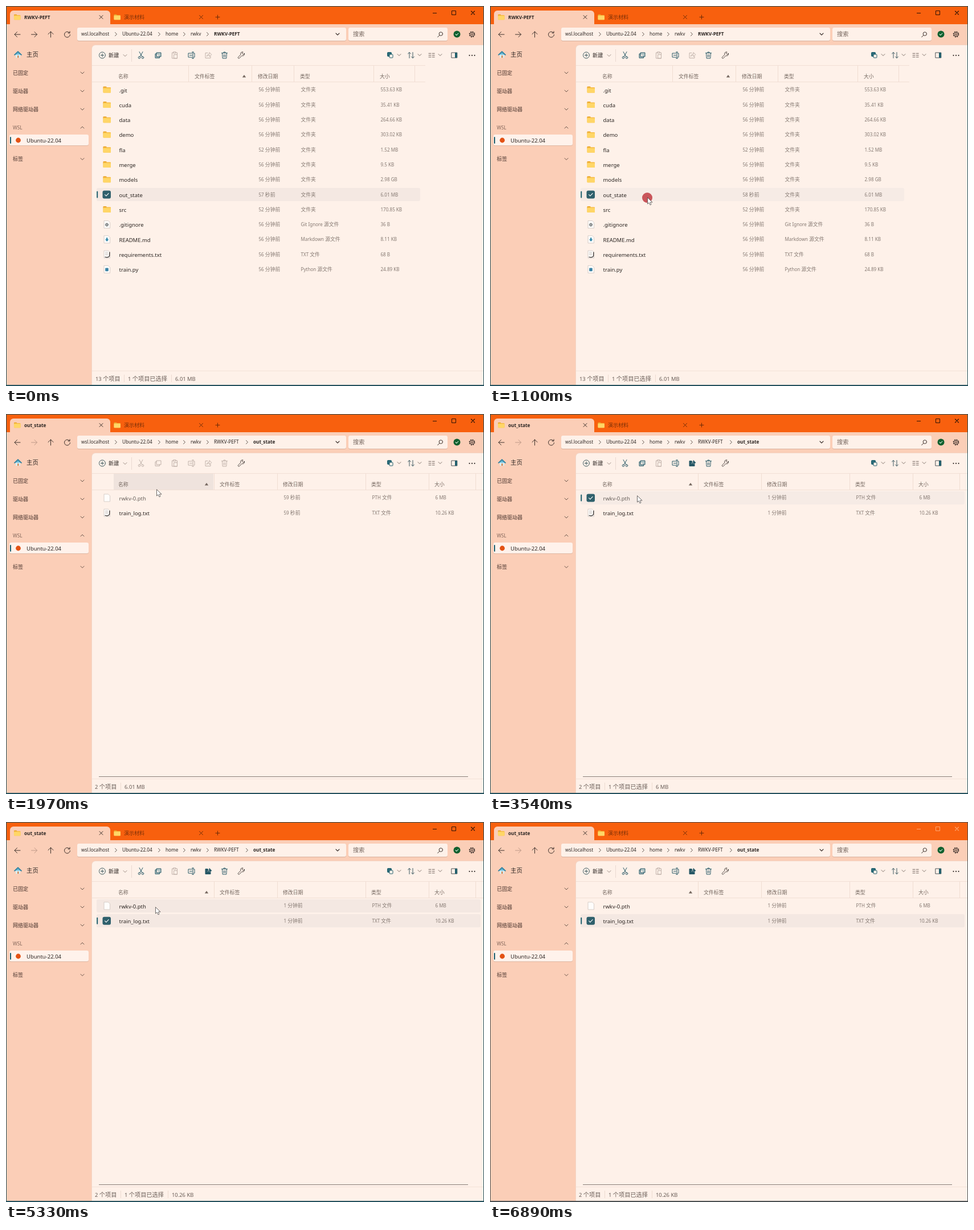
An HTML page with a canvas that plays this animation: 839x668 px, repeating every 6960 ms.

```html
<!DOCTYPE html>
<html lang="zh-CN">
<head>
<meta charset="utf-8">
<style>
html, body { margin: 0; width: 100%; height: 100%; overflow: hidden; background: #fbceb7; }
canvas { display: block; width: 839px; height: 668px; }
</style>
</head>
<body>
<canvas id="stage"></canvas>
<script>
const W = 839, H = 668, LOOP = 6960;
const ROW0 = 147.4, STEP = 26.29;
const canvas = document.getElementById('stage');
const ctx = canvas.getContext('2d');
const dpr = window.devicePixelRatio || 1;
canvas.width = W * dpr;
canvas.height = H * dpr;

const C = {
  orange: '#f8600e', peach: '#fbceb7', panel: '#fef1e9', line: '#f1dfd5', ink: '#2b2522',
  dim: '#857972', head: '#74675f', side: '#83665a', teal: '#1f5f6d', off: '#bfb1a9', edge: '#24515d'
};

// Moments of the story, in ms
const T = { blur: 70, tick: 150, focus: 1070, open: 1420, title: 1480, minute: 2060, pickFirst: 2350, pickSecond: 4410, end: 6890 };
const CLICKS = [[1070, 1170], [1260, 1340], [2350, 2450], [4410, 4510]];
const PATH = [
  [70, 850, 330], [280, 286, 331], [710, 277, 336], [1100, 276, 337], [1450, 276, 337],
  [1970, 264, 133], [2090, 259, 143], [3510, 259, 143], [3540, 258, 144], [3660, 256.5, 149.5],
  [4090, 256.5, 149.5], [4210, 258, 172], [4520, 258, 172], [4840, 260, 169], [5040, 260, 169],
  [5160, 262, 152], [5300, 262, 152], [5330, 262, 150], [5550, 261, 173], [5850, 261, 173], [6060, 850, 284]
];

const ICON = {
  back: 'M5 0H-5M-.5 -4.5L-5 0L-.5 4.5',
  next: 'M-5 0H5M.5 -4.5L5 0L.5 4.5',
  up: 'M0 5V-5M-4.5 -.5L0 -5L4.5 -.5',
  reload: 'M4.2 -2.6A5 5 0 1 0 5 .4M4.5 -5.4V-2.4H1.5',
  down: 'M-3 -1.5L0 1.5L3 -1.5',
  fold: 'M-3 1.5L0 -1.5L3 1.5',
  right: 'M-1.5 -3L1.5 0L-1.5 3',
  cross: 'M-3 -3L3 3M3 -3L-3 3',
  plus: 'M-3.5 0H3.5M0 -3.5V3.5',
  add: 'M5.5 0A5.5 5.5 0 1 1 -5.5 0A5.5 5.5 0 1 1 5.5 0M-2.7 0H2.7M0 -2.7V2.7',
  cut: 'M-3 -6L1.8 2.6M3 -6L-1.8 2.6M-1.2 4.1A1.8 1.8 0 1 1 -4.8 4.1A1.8 1.8 0 1 1 -1.2 4.1M4.8 4.1A1.8 1.8 0 1 1 1.2 4.1A1.8 1.8 0 1 1 4.8 4.1',
  copy: 'M-2.5 -4.5H5V2.5H-2.5ZM-2.5 -2.5H-5V4.8H2.5V2.5',
  paste: 'M-2 -4.5H-4.5V5.5H4.5V-4.5H2M-2 -5.8H2V-3.5H-2ZM-1 -1H4.5V5.5H-1Z',
  rename: 'M1 -3.5H-5.5V3.5H1M4 -3.5H5.5V3.5H4M2.5 -5.5V5.5M1 -5.5H4M1 5.5H4M-3 0H1',
  share: 'M-1 -4H-5V5H4V2M-2.5 2C-2 -1 0 -2 2 -2V-5L5.8 -1L2 2.5V0C0 0 -1.5 .5 -2.5 2',
  trash: 'M-5 -3.8H5M-1.5 -4V-5.5H1.5V-4M-4 -3.8L-3.3 5.5H3.3L4 -3.8M-1.2 -1V3M1.2 -1V3',
  wrench: 'M5.5 -3.2A3.3 3.3 0 0 1 1 .8L-3.3 5.2A1.4 1.4 0 0 1 -5.3 3.2L-1 -1A3.3 3.3 0 0 1 3.2 -5.5L1.2 -3.4L3.4 -1.2Z',
  sort: 'M-3 5V-5M-5.5 -2.5L-3 -5L-.5 -2.5M3 -5V5M.5 2.5L3 5L5.5 2.5',
  cols: 'M-5 -3.2H-1M-5 0H-1M-5 3.2H-1M1.2 -3.2H5.2M1.2 0H5.2M1.2 3.2H5.2',
  pane: 'M-4.8 -4.5H4.8V4.5H-4.8Z',
  lens: 'M4.5 -1.5A3.2 3.2 0 1 1 -1.9 -1.5A3.2 3.2 0 1 1 4.5 -1.5M-1 .9L-4.3 4.2',
  tick: 'M-3.2 .2L-1 2.4L3.3 -2',
  house: 'M-6 .4L0 -5.4L6 .4',
  cursor: 'M0 0V11L2.6 8.7L4.5 12.8L6.5 11.9L4.7 8H8.2Z'
};
for (const k in ICON) ICON[k] = new Path2D(ICON[k]);

function icon(name, x, y, color = '#3c302b', width = 1, fill) {
  ctx.save();
  ctx.translate(x, y);
  if (fill) { ctx.fillStyle = fill; ctx.fill(ICON[name]); }
  ctx.strokeStyle = color;
  ctx.lineWidth = width;
  ctx.lineJoin = ctx.lineCap = 'round';
  ctx.stroke(ICON[name]);
  ctx.restore();
}

function box(x, y, w, h, color, r = 0, border) {
  ctx.beginPath();
  ctx.roundRect(x, y, w, h, r);
  if (color) { ctx.fillStyle = color; ctx.fill(); }
  if (border) { ctx.strokeStyle = border; ctx.lineWidth = 1; ctx.stroke(); }
}

function disc(x, y, r, color) {
  ctx.beginPath();
  ctx.arc(x, y, r, 0, Math.PI * 2);
  ctx.fillStyle = color;
  ctx.fill();
}

// Latin runs are set slightly smaller than the Han runs beside them
function text(s, x, y, size, color, weight = 400) {
  ctx.fillStyle = color;
  for (const run of s.match(/[\u4e00-\u9fff]+|[^\u4e00-\u9fff]+/g)) {
    const han = run > '\u4e00';
    ctx.font = `${weight} ${han ? size : size * 0.92}px ${han ? '"Noto Sans CJK SC", ' : ''}"Noto Sans", "Noto Sans CJK SC", sans-serif`;
    ctx.fillText(run, x, y + size * 0.35);
    x += ctx.measureText(run).width;
  }
}

function folder(x, y, s = 1) {
  box(x - 6.5 * s, y - 5.5 * s, 6 * s, 4 * s, '#e9a52c', 1);
  box(x - 6.5 * s, y - 4 * s, 13.5 * s, 9.5 * s, '#f6b93f', 1);
  box(x - 6.5 * s, y - 2.6 * s, 13.5 * s, 8.1 * s, '#ffd667', 1);
}

function page(x, y) {
  ctx.beginPath();
  ctx.moveTo(x - 5, y - 6.5);
  ctx.lineTo(x + 2.5, y - 6.5);
  ctx.lineTo(x + 5.5, y - 3.5);
  ctx.lineTo(x + 5.5, y + 6.5);
  ctx.lineTo(x - 5, y + 6.5);
  ctx.closePath();
  ctx.fillStyle = '#fffdfb';
  ctx.fill();
  ctx.strokeStyle = '#cfc5bf';
  ctx.lineWidth = 0.8;
  ctx.stroke();
}

function gear(x, y, r, color) {
  ctx.strokeStyle = color;
  ctx.lineWidth = r * 0.35;
  for (const [radius, dash] of [[r, [r * 0.42, r * 0.3654]], [r * 0.78, []], [r * 0.3, []]]) {
    ctx.setLineDash(dash);
    ctx.beginPath();
    ctx.arc(x, y, radius, 0, Math.PI * 2);
    ctx.stroke();
    ctx.lineWidth = Math.min(1, r * 0.3);
  }
  ctx.setLineDash([]);
}

function fileIcon(kind, x, y) {
  if (kind === 'dir') return folder(x, y - 0.3);
  page(x, y);
  if (kind === 'git') gear(x, y + 0.5, 2.7, '#4d5558');
  if (kind === 'md') {
    box(x - 1, y - 3, 2.4, 4, '#2d86a8');
    ctx.beginPath();
    ctx.moveTo(x - 3, y); ctx.lineTo(x + 3.4, y); ctx.lineTo(x + 0.2, y + 3.6);
    ctx.fill();
  }
  if (kind === 'py') box(x - 2.8, y - 2.3, 5.6, 5.6, '#3c84a6', 1);
  if (kind === 'txt') {
    for (let i = 0; i < 3; i++) box(x - 3, y - 4 + i * 2.2, 5, 0.8, '#bdb7b3');
    ctx.strokeStyle = '#4b4542';
    ctx.lineWidth = 1.4;
    ctx.beginPath();
    ctx.moveTo(x + 4.8, y - 4); ctx.lineTo(x + 4.6, y + 3);
    ctx.quadraticCurveTo(x + 2, y + 6.5, x - 3.5, y + 4.5);
    ctx.stroke();
  }
}

const dir = (name, size, age = '56 分钟前') => ['dir', name, age, '文件夹', size];
const file = (kind, name, type, size) => [kind, name, '56 分钟前', type, size];
const ROOT = {
  cols: [197, 331, 442, 516, 656], seps: [320, 431, 505, 645, 717], sort: 418, right: 727,
  rows: [
    dir('.git', '553.63 KB'), dir('cuda', '35.41 KB'), dir('data', '264.66 KB'), dir('demo', '303.02 KB'),
    dir('fla', '1.52 MB', '52 分钟前'), dir('merge', '9.5 KB'), dir('models', '2.98 GB'),
    dir('out_state', '6.01 MB', null), dir('src', '170.85 KB', '52 分钟前'),
    file('git', '.gitignore', 'Git Ignore 源文件', '36 B'),
    file('md', 'README.md', 'Markdown 源文件', '8.11 KB'),
    file('txt', 'requirements.txt', 'TXT 文件', '68 B'),
    file('py', 'train.py', 'Python 源文件', '24.89 KB')
  ]
};
const SUB = {
  cols: [197, 375, 486, 641, 752], seps: [365, 476, 631, 742, 824], sort: 352, right: 833,
  rows: [['page', 'rwkv-0.pth', null, 'PTH 文件', '6 MB'], ['txt', 'train_log.txt', null, 'TXT 文件', '10.26 KB']]
};
const LABELS = ['名称', '文件标签', '修改日期', '类型', '大小'];

function cursorAt(t) {
  if (t < PATH[0][0] || t > PATH[PATH.length - 1][0]) return null;
  const i = Math.max(1, PATH.findIndex(p => p[0] >= t));
  const [t0, x0, y0] = PATH[i - 1], [t1, x1, y1] = PATH[i];
  const u = (t - t0) / (t1 - t0), e = u * u * (3 - 2 * u);
  return { x: x0 + (x1 - x0) * e, y: y0 + (y1 - y0) * e };
}

function titleBar(active, title) {
  box(0, 0, W, 32, C.orange);
  ctx.beginPath();
  ctx.roundRect(7, 8, 176, 25, [6, 6, 0, 0]);
  ctx.fillStyle = C.peach;
  ctx.fill();
  folder(19.5, 19.5, 0.85);
  text(title, 32, 19.7, 8.9, C.ink, 600);
  icon('cross', 167, 19.5);
  folder(195, 19.5, 0.85);
  text('演示材料', 207, 19.7, 9, '#7d3108');
  icon('cross', 342.5, 19.5, '#6b2a07');
  icon('plus', 371.5, 19.5, '#6b2a07');
  const ink = active ? '#2b1206' : '#ffa673';
  box(749, 12, 7, 1, ink);
  box(782.5, 8.5, 7, 7, null, 0, ink);
  icon('cross', 819.5, 12, ink, 1.1);
}

function navBar(inside) {
  icon('back', 20, 50);
  icon('next', 49.5, 50, inside ? '#bd9887' : undefined);
  icon('up', 78.5, 50);
  icon('reload', 107.5, 50);
  for (const [x, w] of [[125, 472], [601, 174]]) {
    box(x, 39, w, 23, '#d9b19e', 3);
    box(x, 38, w, 23, C.panel, 3);
  }
  const crumbs = [['wsl.localhost', 132], ['Ubuntu-22.04', 204], ['home', 280], ['rwkv', 324], ['RWKV-PEFT', 365]];
  if (inside) crumbs.push(['out_state', 434]);
  crumbs.forEach(([s, x], i) => {
    if (i) icon('right', x - 11, 49.5, '#5f504a');
    text(s, x, 49.3, 8.9, C.ink, i === crumbs.length - 1 ? 600 : 400);
  });
  icon('down', 582, 49.5, '#3c302b', 1.1);
  text('搜索', 609, 49.5, 10.2, '#75665e');
  icon('lens', 762, 50.5);
  disc(791.5, 49.5, 6, '#11602f');
  ctx.save();
  ctx.translate(791.5, 49.5);
  ctx.scale(0.75, 0.75);
  icon('tick', 0, 0, '#d6efdc', 1.4);
  ctx.restore();
  gear(818, 49.8, 4.6, '#3c302b');
}

function sideBar() {
  icon('house', 21, 85.5, '#2f7f9d', 1.7, '#69b9d6');
  box(17, 85.5, 8, 5.5, '#d9edf2');
  box(20, 87, 2.5, 4, '#d58b5a');
  text('主页', 36, 85.5, 10.4, C.ink);
  const groups = [['已固定', 117.5], ['驱动器', 149.5], ['网络驱动器', 181.5], ['WSL', 213.5], ['标签', 269]];
  for (const [s, y] of groups) {
    text(s, 12, y, 9, C.side, s === 'WSL' ? 400 : 600);
    icon(s === 'WSL' ? 'fold' : 'down', 134, y, '#6d554b');
  }
  box(6, 227, 139, 19, '#deb7a3', 3);
  box(6, 226, 139, 19, '#fff2eb', 3);
  box(7, 230, 2, 12, C.teal, 1);
  disc(21.5, 236, 4.4, '#e35214');
  text('Ubuntu-22.04', 36, 236, 10.3, C.ink);
}

function toolBar(selected, sharing) {
  icon('add', 169, 86.5, '#3f5a60');
  text('新建', 180, 86.5, 9.2, C.ink, 500);
  icon('down', 209, 87, '#9a8981');
  box(220, 76, 1, 22, '#eadad1');
  const on = ok => ok ? '#275866' : C.off;
  icon('cut', 237, 86.5, on(selected));
  icon('copy', 267, 86.5, on(selected), 1, selected ? '#b5c6c6' : null);
  icon('paste', 296, 86.5, C.off);
  icon('rename', 325.5, 86.5, on(selected));
  icon('share', 355, 86.5, on(sharing), 1, sharing ? '#275866' : null);
  icon('trash', 383.5, 86.5, on(selected));
  icon('wrench', 413, 86.5, '#4d4541');
  box(669.5, 81.5, 7, 7, '#2b6b78', 1, C.teal);
  box(673, 85, 6, 6, C.panel, 1, C.teal);
  icon('sort', 711, 86.5, '#38565f');
  icon('cols', 747, 86.5, '#6f625c');
  icon('pane', 787, 86.5, '#4d5558');
  box(788, 82, 3.8, 9, C.teal);
  for (const x of [690, 726, 762]) icon('down', x, 86, '#83746c');
  for (const x of [813.5, 818, 822.5]) disc(x, 86.8, 1.1, C.ink);
}

function header(view, hover) {
  if (hover) box(189, 105, 175, 28, '#efe3dd');
  box(151, 104, view === SUB ? 687 : 585, 1, C.line);
  box(151, 133, view === SUB ? 687 : 585, 1, C.line);
  view.seps.forEach(x => box(x, 105, 1, 28, '#f0ddd2'));
  LABELS.forEach((s, i) => text(s, view.cols[i], 123.5, 8.9, C.head, 500));
  ctx.fillStyle = '#75675f';
  ctx.beginPath();
  ctx.moveTo(view.sort - 3.2, 125.5);
  ctx.lineTo(view.sort + 3.2, 125.5);
  ctx.lineTo(view.sort, 121);
  ctx.fill();
}

function rows(view, picked, hovered, age, t) {
  view.rows.forEach(([kind, name, when, type, size], i) => {
    const y = ROW0 + i * STEP, on = i === picked, over = i === hovered;
    if (on || over) box(159, y - 11.7, view.right - 159, 23.3, on && over ? '#f6ebe5' : '#f4e8e2', 3);
    if (on) {
      box(159.2, y - 6, 2, 12, C.teal, 1);
      box(169.5, y - 7, 14.5, 14, '#2f606c', 3);
      icon('tick', 176.8, y, '#fff', 1.1);
    } else {
      fileIcon(kind, 177, y);
    }
    const pale = view === SUB && i === 0 && t < 4090;
    text(name, 198.5, y + 0.6, 10.3, pale ? '#68605b' : C.ink);
    text(when || age, view.cols[2] + 1.5, y, 8.8, C.dim);
    text(type, view.cols[3] + 1.5, y, 8.8, C.dim);
    text(size, view.cols[4] + 1.5, y, 8.8, C.dim);
  });
}

function status(parts, xs) {
  box(151, 641, 687, 1, '#f3e2d8');
  parts.forEach((s, i) => {
    if (i) box(xs[i] - 7, 648, 1, 13, '#ecdbd1');
    text(s, xs[i], 655, 10.2, '#685c56');
  });
}

function draw(t) {
  const inside = t >= T.open, view = inside ? SUB : ROOT;
  const titled = t >= T.title;
  const active = t < T.blur || (t >= T.focus && t < T.end);
  const at = cursorAt(t);
  const inList = at && at.x > 159 && at.x < view.right && at.y >= 134.3;
  const hovered = inList ? Math.floor((at.y - 134.3) / STEP) : -1;
  const onHead = inside && at && at.x > 189 && at.x < 364 && at.y > 104 && at.y < 134.3;
  let picked = 7, age = t < T.tick ? '57 秒前' : '58 秒前';
  if (inside) {
    picked = t < T.pickFirst ? -1 : t < T.pickSecond ? 0 : 1;
    age = t < T.minute ? '59 秒前' : '1 分钟前';
  }

  ctx.setTransform(dpr, 0, 0, dpr, 0, 0);
  box(0, 0, W, H, C.peach);
  titleBar(active, titled ? 'out_state' : 'RWKV-PEFT');
  navBar(titled);
  sideBar();
  box(150, 68, 700, 620, '#f3d5c5', [7, 0, 0, 0]);
  box(151, 69, 700, 620, C.panel, [6, 0, 0, 0]);
  toolBar(picked >= 0, inside && picked >= 0);
  header(view, onHead);
  ctx.globalAlpha = inside ? Math.min(1, (t - T.open) / 120) : 1;
  rows(view, picked, hovered, age, t);
  ctx.globalAlpha = 1;

  if (!inside) {
    status(['13 个项目', '1 个项目已选择', '6.01 MB'], [157, 214, 297]);
  } else {
    box(163, 637, 648, 1, '#877c77');
    if (picked < 0) status(['2 个项目', '6.01 MB'], [156, 208]);
    else status(['2 个项目', '1 个项目已选择', SUB.rows[picked][4]], [156, 208, 291]);
  }

  const edge = active ? C.edge : '#4b5052';
  box(0, 0, W, 1, edge);
  box(0, 0, 1, H, edge);
  box(W - 1, 0, 1, H, edge);
  box(0, H - 2, W, 2, edge);

  if (at) {
    if (CLICKS.some(([a, b]) => t >= a && t < b)) disc(at.x, at.y, 9, '#c9555a');
    icon('cursor', at.x + 0.5, at.y, '#4a4644', 0.8, '#fff');
  }
}

function tick() {
  draw(performance.now() % LOOP);
  requestAnimationFrame(tick);
}
tick();
</script>
</body>
</html>
```
